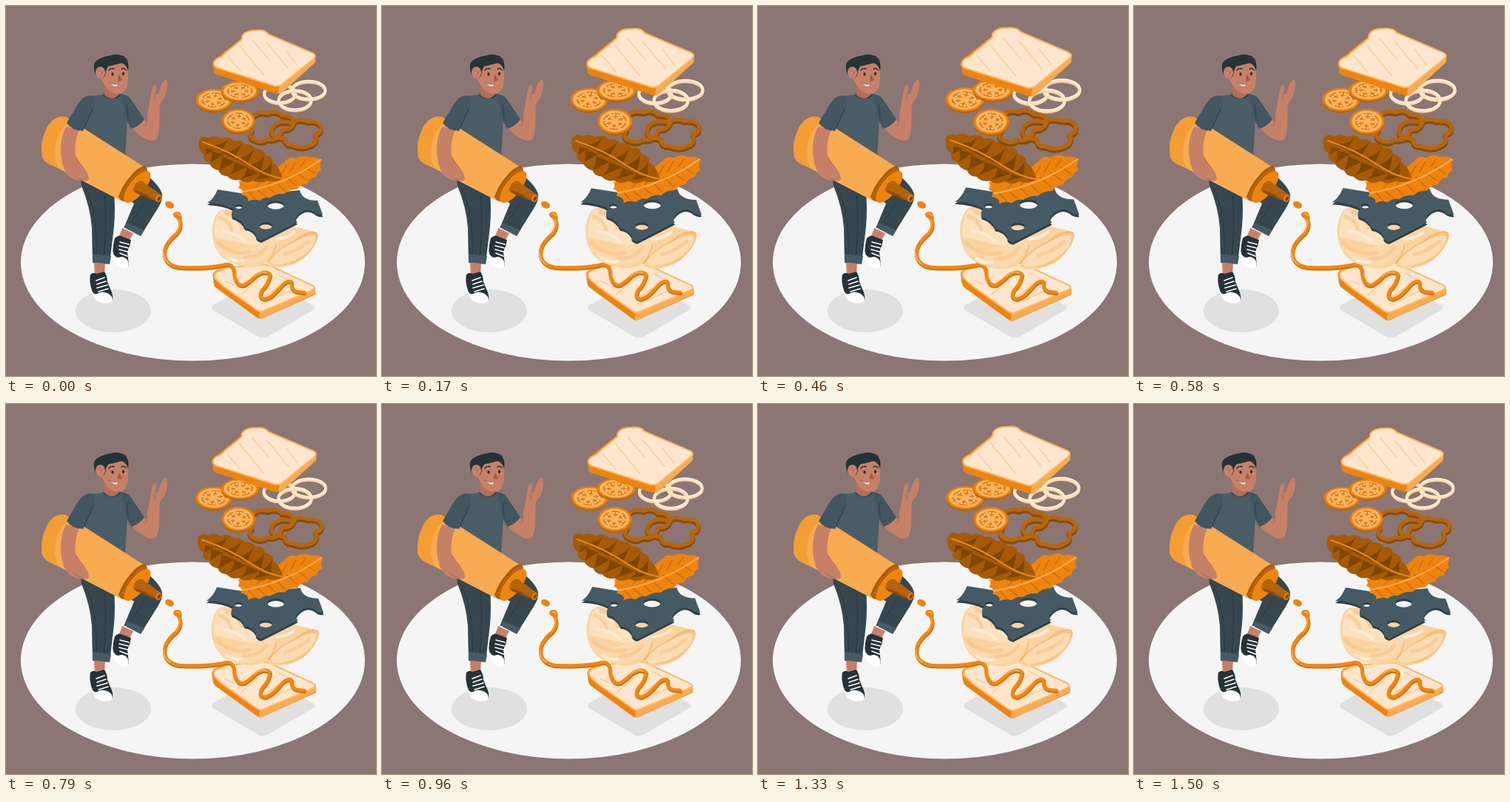
Write an HTML page that moves like this. It is 500 px wide and 500 px high and loops after 1.54 s.

```html
<!DOCTYPE html>
<html lang="en">
<head>
<meta charset="utf-8">
<title>Sandwich</title>
<style>
html, body { margin: 0; width: 100%; height: 100%; overflow: hidden; background: #8b7674; }
svg { display: block; width: 100vw; height: 100vh; }
.line { fill: none; stroke-linecap: round; stroke-linejoin: round; }
</style>
</head>
<body>
<svg viewBox="0 0 500 500">
<rect width="500" height="500" fill="#8b7674"/>
<ellipse cx="252.5" cy="346.500" rx="232.500" ry="133" fill="#f5f5f5"/>
<ellipse cx="145" cy="412" rx="51" ry="29" fill="#e0e0e0"/>
<path d="M280 404L343 370Q348 367 354 370L416 405Q420 408 415 411L353 447Q347 450 341 447L280 411Q276 408 280 404Z" fill="#e0e0e0"/>

<!-- legs -->
<path d="M101 232L146 248Q148 275 146 298L140 348L117 346L116 300Q114 272 102 243Z" fill="#37474f"/>
<path d="M108 246Q124 282 122 338M133 255Q137 285 132 338" class="line" stroke="#263238" stroke-width=".8"/>
<path d="M117 335L142 338L140 349L117 347Z" fill="#455a64"/>
<path d="M119 347L134 348L133 362L120 362Z" fill="#c78068"/>
<path d="M150 248L190 228Q209 244 211 255Q212 262 206 272L183 309L160 298L173 267Z" fill="#37474f"/>
<path d="M164 293L187 303L182 311L159 299Z" fill="#455a64"/>
<path d="M186 266L170 293" class="line" stroke="#263238" stroke-width=".8"/>
<path d="M157 300L172 307L166 318L153 311Z" fill="#c78068"/>
<!-- shoes -->
<g>
<path d="M114 363Q118 359 122 362L133 359Q137 365 137 373L143 387Q146 396 142 400Q132 404 122 397L116 384Q112 372 114 363Z" fill="#263238"/>
<path d="M115 383Q117 390 123 389Q130 384 139 389Q146 394 143 400Q133 405 122 398Q116 391 115 383Z" fill="#fff"/>
<path d="M122 371L133 367M123 376L135 372M123 381L137 377M125 386L138 382" class="line" stroke="#fff" stroke-width="1.700"/>
</g>
<g>
<path d="M147 314Q152 308 158 312L169 316Q168 324 164 332L166 350Q163 357 157 354L147 344Q142 330 147 314Z" fill="#263238"/>
<path d="M144 332Q147 340 152 340Q159 337 164 343Q168 351 163 355Q157 357 149 349Q143 342 144 332Z" fill="#fff"/>
<path d="M154 319L166 322M153 324L165 327M153 329L164 332M154 334L164 338" class="line" stroke="#fff" stroke-width="1.700"/>
</g>

<!-- torso, raised arm -->
<path d="M168 162L186 154Q193 158 191 153L191 146Q194 132 196 120Q197 108 202 106Q204 109 202 119L206 120Q207 108 215 99Q219 99 218 106Q218 123 208 132L207 151Q208 172 203 180Q197 185 188 179Q175 172 168 162Z" fill="#c78068"/>
<path d="M202 119Q200 124 201 129M191 148Q191 160 187 163" class="line" stroke="#a86550" stroke-width=".9"/>
<path d="M112 121Q125 122 134 118H153Q163 121 166 126L164 154L161 204L108 212L104 160Q105 136 112 121Z" fill="#4a5d67"/>
<path d="M156 119Q166 120 170 128L187 153Q181 162 169 166L162 152Z" fill="#415660"/>
<path d="M163 133L165 152" class="line" stroke="#263238" stroke-width=".8"/>
<path d="M133 118Q144 125 154 119L155 122Q143 130 131 121Z" fill="#37474f"/>
<path d="M133 100L153 112V119Q144 130 133 120Z" fill="#b66f58"/>

<!-- head -->
<path d="M132 86Q143 76 163 78L165 91Q166 106 161 114Q157 120 147 118Q137 116 133 106L128 97Z" fill="#c78068"/>
<path d="M122 95Q116 81 121 75Q128 69 140 67Q151 63 161 69Q167 75 165 88Q163 79 156 77Q146 80 139 81Q135 84 134 94L131 97Z" fill="#263238"/>
<ellipse cx="127.500" cy="90" rx="6.500" ry="8" fill="#c78068"/>
<path d="M124 87Q128 86 130 92" class="line" stroke="#a86550"/>
<ellipse cx="144" cy="92" rx="1.700" ry="2.300" fill="#263238"/>
<ellipse cx="158.500" cy="91.500" rx="1.600" ry="2.200" fill="#263238"/>
<path d="M139 87Q142 83 146 85M156 85Q159 83 162 86" class="line" stroke="#263238" stroke-width="1.500"/>
<path d="M152 92L157 100Q154 103 151 101Z" fill="#a95a43"/>
<path d="M140 103Q146 108 152 105Q151 110 147 109Q143 108 140 103Z" fill="#fff" stroke="#7d4032" stroke-width=".6"/>

<!-- bottle -->
<path d="M81 150Q65 147 55 165Q45 186 49 204Q52 212 66 217L157 264L189 219Z" fill="#f8ab50"/>
<path d="M81 150Q65 147 55 165Q45 186 49 204Q52 212 66 217L73 220Q61 206 68 183Q73 164 87 154Z" fill="#f49d35"/>
<path d="M188 216Q193 221 190 233Q183 252 166 264Q156 266 152 258Q156 244 169 229Q179 217 188 216Z" fill="#a95c0a"/>
<path id="grip" fill="none" stroke="#d9800f" stroke-width="1"/>
<ellipse cx="177.500" cy="244.500" rx="10.500" ry="26" transform="rotate(38 177.500 244.500)" fill="#ee8410"/>
<path d="M172 248Q174 237 183 236L209 255Q212 261 206 265L181 255Q173 253 172 248Z" fill="#b4630a"/>
<path d="M173 250Q177 247 205 264L181 255Z" fill="#8f4c05"/>
<ellipse cx="206.500" cy="260" rx="3.500" ry="5.200" transform="rotate(28 206.500 260)" fill="#ee8410"/>
<ellipse cx="206.800" cy="260.200" rx="2" ry="3.500" transform="rotate(28 206.800 260.200)" fill="#7d4300"/>

<!-- holding arm -->
<path d="M81 163L99 167Q92 184 94 202Q99 212 105 218Q112 227 112 234Q110 238 102 236Q88 235 82 227Q74 213 74 194Q74 176 81 163Z" fill="#c78068"/>
<path d="M95 205Q98 211 104 218M91 228Q99 235 104 235" class="line" stroke="#a86550" stroke-width=".8"/>
<path d="M114 121Q104 121 97 133L82 158Q88 168 104 169L118 142Q123 122 114 121Z" fill="#415660"/>
<path d="M117 139L105 166" class="line" stroke="#263238" stroke-width=".7"/>

<!-- lower slice -->
<g data-c="349 386">
<path d="M280 368Q277 360 287 356L300 353L343 351L416 381Q419 383 418 390L347 422Q343 424 339 421L284 381Q280 378 280 368Z" fill="#ee8410"/>
<path d="M343 412L418 381V389L347 422Q343 424 342 421Z" fill="#f8ab50"/>
<path d="M283 369Q279 361 288 358L301 353L344 350Q350 348 357 351L415 378Q419 381 414 384L348 412Q343 414 339 411L294 379Z" fill="#fde6cd" stroke="#f9b968" stroke-width="2"/>
<path d="M297 372L308 377M318 390L339 371M357 398L384 385M365 362L389 375" class="line" stroke="#f6cfa0" stroke-width="1.500"/>
</g>

<!-- sauce -->
<g class="line">
<path id="under" stroke="#d06c05" stroke-width="5" transform="translate(.500 1.500)"/>
<path id="sauce" stroke="#f08714" stroke-width="4.500" d="M232 284Q240 297 230 308Q214 321 214 334Q215 350 234 353Q268 355 294 350Q306 346 308 358Q310 380 322 377Q329 373 338 364Q351 356 357 363Q355 375 346 384Q340 395 350 396Q359 394 369 382Q379 369 386 373Q385 384 393 386L403 387"/>
<path stroke="#fbb964" stroke-width="1.300" d="M234 288Q236 297 229 306M213 333Q213 345 222 349M311 362Q313 375 320 375M335 365Q346 357 353 361M350 392Q361 386 371 377"/>
</g>
<path d="M215 267Q216 263 221 264Q228 267 227 271Q225 275 220 273Q215 271 215 267Z" fill="#ee8410"/>
<path d="M226 281Q229 276 235 279Q239 283 237 290Q232 288 228 286Q226 284 226 281Z" fill="#ee8410"/>
<path d="M230 281Q233 280 235 284" class="line" stroke="#fbb964" stroke-width="1.300"/>

<!-- ham -->
<g data-c="350 315">
<path d="M299 275L420 306Q424 317 412 331Q398 350 372 353Q353 354 353 346Q336 358 309 348Q287 342 281 321Q275 299 284 282Q289 273 299 275Z" fill="#fbd3a1"/>
<path d="M340 301L420 306Q407 301 393 314Q367 333 356 349Q377 354 397 344Q416 331 422 311Q421 306 420 306Z" fill="#f9c480"/>
<path d="M358 344Q365 330 388 320Q410 307 418 311Q419 324 403 336Q385 349 364 350Q356 349 358 344Z" fill="#fcdcb3"/>
<path d="M290 277Q280 290 282 313Q297 315 315 320Q349 329 361 315L354 304Z" fill="#fde1bf"/>
<path d="M280 318Q288 343 318 349Q346 353 361 328Q367 317 356 314Q329 326 307 330Q293 333 280 318Z" fill="#fcd9ac"/>
<path d="M289 286Q303 291 305 304M298 281Q316 286 319 301M286 319Q303 338 330 332M322 340Q342 340 352 326M377 335Q396 330 409 318" class="line" stroke="#f8c78a" stroke-width="5" opacity=".65"/>
<path d="M294 304Q313 308 322 317M365 315Q380 314 389 306M299 339Q309 346 320 344" class="line" stroke="#feebd5" stroke-width="4"/>
<path d="M354 346Q366 329 389 318Q410 303 420 307M353 346Q363 335 365 322" class="line" stroke="#f3b164" stroke-width="1"/>
</g>

<!-- cheese -->
<g data-c="350 285">
<path id="slab" fill="#2f4049" transform="translate(0 3)"/>
<path id="slabTop" fill="#455a64" fill-rule="evenodd" d="M272 266Q280 262 286 248L330 255L397 249Q400 263 421 263L428 282Q421 283 416 278Q407 272 397 280Q388 288 394 292L345 317Q337 315 338 310Q333 301 323 300Q319 289 306 285Q303 277 309 275Q295 267 272 266ZM353 269A11 5.500 0 1 0 376 269A11 5.500 0 1 0 353 269ZM342 297A8.500 4.500 0 1 0 360 297A8.500 4.500 0 1 0 342 297ZM309 271A5.500 3 0 1 0 320 271A5.500 3 0 1 0 309 271Z"/>
</g>

<!-- leaves -->
<g data-c="343.500 220">
<path d="M313 236Q321 239 326 233Q350 231 367 218Q373 214 379 208Q384 203 392 206Q402 200 410 205Q419 203 427 208Q423 215 426 222Q420 224 419 231Q410 232 407 240Q398 241 393 248Q383 247 376 254Q365 253 357 259Q350 257 343 263Q335 260 327 264Q329 257 318 255Q322 248 314 246Q318 240 313 236Z" fill="#ee8410"/>
<path d="M327 250L337 261M340 249L350 257M353 244L363 253M365 238L377 250M379 231L392 243M392 225L406 235M404 218L417 226M338 244L348 234M355 240L364 227M370 232L379 216M384 224L391 211M398 217L405 208" class="line" stroke="#cf6c05" stroke-width="1.500"/>
<path d="M320 251Q377 242 425 208" class="line" stroke="#f8ab50" stroke-width="2"/>
<path d="M261 180Q266 174 274 178Q283 174 290 179Q302 175 308 182Q318 180 323 187Q334 186 337 193Q349 192 350 201Q361 203 361 212Q370 217 374 234Q363 239 353 236Q343 241 334 236Q323 241 315 235Q305 237 299 230Q290 230 287 222Q277 220 275 212Q265 209 267 200Q258 196 261 180Z" fill="#a65a05"/>
<path d="M274 188Q290 190 300 180L291 196ZM290 197Q306 199 319 186L308 206ZM309 206Q324 207 335 194L326 214ZM328 215Q341 214 349 202L345 223ZM346 224Q354 220 359 211L358 229ZM270 192Q270 201 268 202L282 194ZM278 196Q279 208 276 212L294 201ZM292 203Q291 214 288 222L309 211ZM309 211Q309 222 300 229L325 218ZM325 218Q326 227 317 234L342 226ZM342 226Q344 231 335 235L357 231Z" fill="#7f4502"/>
<path d="M266 184Q302 196 330 215Q353 230 373 233" class="line" stroke="#e58a1e" stroke-width="2"/>
</g>

<!-- pepper rings -->
<g data-c="378 169" class="line">
<g id="pepper">
<path d="M333 151Q340 141 354 145Q365 140 373 148Q389 147 389 159Q385 168 373 167Q370 183 353 180Q345 186 336 181Q326 177 333 168Q327 158 333 151Z"/>
<path d="M363 161Q370 154 386 158Q395 151 408 156Q423 155 426 163Q427 172 418 173Q422 184 412 188Q399 194 387 188Q377 189 377 179Q358 178 359 169Q359 164 363 161Z"/>
</g>
</g>

<g data-c="390 122" class="line" id="onions"></g>
<g data-c="299 137" id="tomatoes"></g>

<!-- upper slice -->
<g data-c="348.500 76">
<path d="M279 79Q279 72 286 69L320 42Q318 33 337 32Q351 31 358 39L416 64Q420 67 418 76L373 117Q369 120 363 118L286 93Q279 91 281 85Z" fill="#ee8410"/>
<path d="M369 108L418 69V76L373 117Q369 120 368 117Z" fill="#f8ab50"/>
<path d="M284 83Q277 77 286 71Q292 69 296 64L318 46Q320 43 319 41Q323 33 338 33Q351 32 354 38L415 64Q420 67 416 71L373 106Q369 109 363 108Z" fill="#fde6cd" stroke="#f9b968" stroke-width="2"/>
<path d="M300 68L317 88M316 54L348 93M333 46L355 72M352 49L381 84M378 60L393 79" class="line" stroke="#f6cfa0" stroke-width="1.500"/>
</g>
</svg>
<script>
const $ = id => document.getElementById(id);
const d = id => $(id).getAttribute('d');

$('under').setAttribute('d', d('sauce'));
$('slab').setAttribute('d', d('slabTop'));
$('slab').setAttribute('fill-rule', 'evenodd');

// Ridges along the cap
let ridges = '';
for (let i = 0; i < 15; i++) {
  const u = i / 14, x = 184 - 29 * u, y = 219 + 39 * u, bow = 3 * Math.sin(Math.PI * u);
  ridges += `M${x - bow} ${y - bow}l6 4`;
}
$('grip').setAttribute('d', ridges);

const rings = $('pepper').innerHTML;
$('pepper').innerHTML =
  `<g stroke="#8a4a04" stroke-width="6" transform="translate(0 2.500)">${rings}</g>` +
  `<g stroke="#b5660f" stroke-width="5">${rings}</g>`;

const onion = (x, y, rx, ry) => {
  const ring = (dy, color, w, extra = '') =>
    `<ellipse cx="${x}" cy="${y + dy}" rx="${rx}" ry="${ry}" stroke="${color}" stroke-width="${w}" ${extra}/>`;
  return ring(1.5, '#f8cf9c', 4) + ring(0, '#fff1df', 3.5) + ring(.5, '#f6c58c', .6);
};
$('onions').innerHTML = onion(370, 118, 21, 12.5) + onion(409, 113.5, 22.5, 12) + onion(390.5, 127, 22, 13);

const tomato = (x, y, rx, ry, turn) => {
  let flesh = '';
  for (let i = 0; i < 6; i++) {
    const at = (r, off) => {
      const a = turn + (i + off) * Math.PI / 3;
      return `${r * Math.cos(a)} ${r * Math.sin(a)}`;
    };
    const seed = off => {
      const [cx, cy] = at(.52, off).split(' ');
      return `<circle cx="${cx}" cy="${cy}" r=".065" fill="#fde0b8"/>`;
    };
    flesh += `<path d="M${at(.2, .5)}L${at(.68, .12)}A.7 .7 0 0 1 ${at(.68, .88)}Z" fill="#e87d0b"/>` +
      seed(.32) + seed(.68);
  }
  return `<g transform="translate(${x} ${y}) scale(${rx} ${ry})">` +
    `<circle cy=".14" r="1" fill="#b9620a"/><circle r="1" fill="#e87d0b"/>` +
    `<circle r=".86" fill="#f9b564"/>${flesh}</g>`;
};
$('tomatoes').innerHTML =
  tomato(281, 127, 24.5, 15, .2) + tomato(316, 115, 25.5, 13.5, .5) + tomato(314, 155, 22.5, 16, .1);

const layers = [...document.querySelectorAll('[data-c]')].map(el => [el, el.dataset.c]);
const LOOP = 1540, STEP = 1000 / 24;
const keys = [[0, 0], [345, .1], [870, 0], [1185, .1], [1500, 0], [LOOP, 0]];

function growth(t) {
  const i = keys.findIndex(k => k[0] > t);
  const [t0, a] = keys[i - 1], [t1, b] = keys[i];
  return a + (b - a) * (t - t0) / (t1 - t0);
}

function draw(now) {
  const step = Math.min(36, Math.floor((now % LOOP + 4) / STEP));
  const s = 1 + growth(step * STEP);
  for (const [el, c] of layers) {
    const [x, y] = c.split(' ');
    el.setAttribute('transform', `translate(${x} ${y}) scale(${s}) translate(${-x} ${-y})`);
  }
}

let start;
function tick(now) {
  start ??= now;
  draw(now - start);
  requestAnimationFrame(tick);
}
draw(0);
requestAnimationFrame(tick);
</script>
</body>
</html>
```
